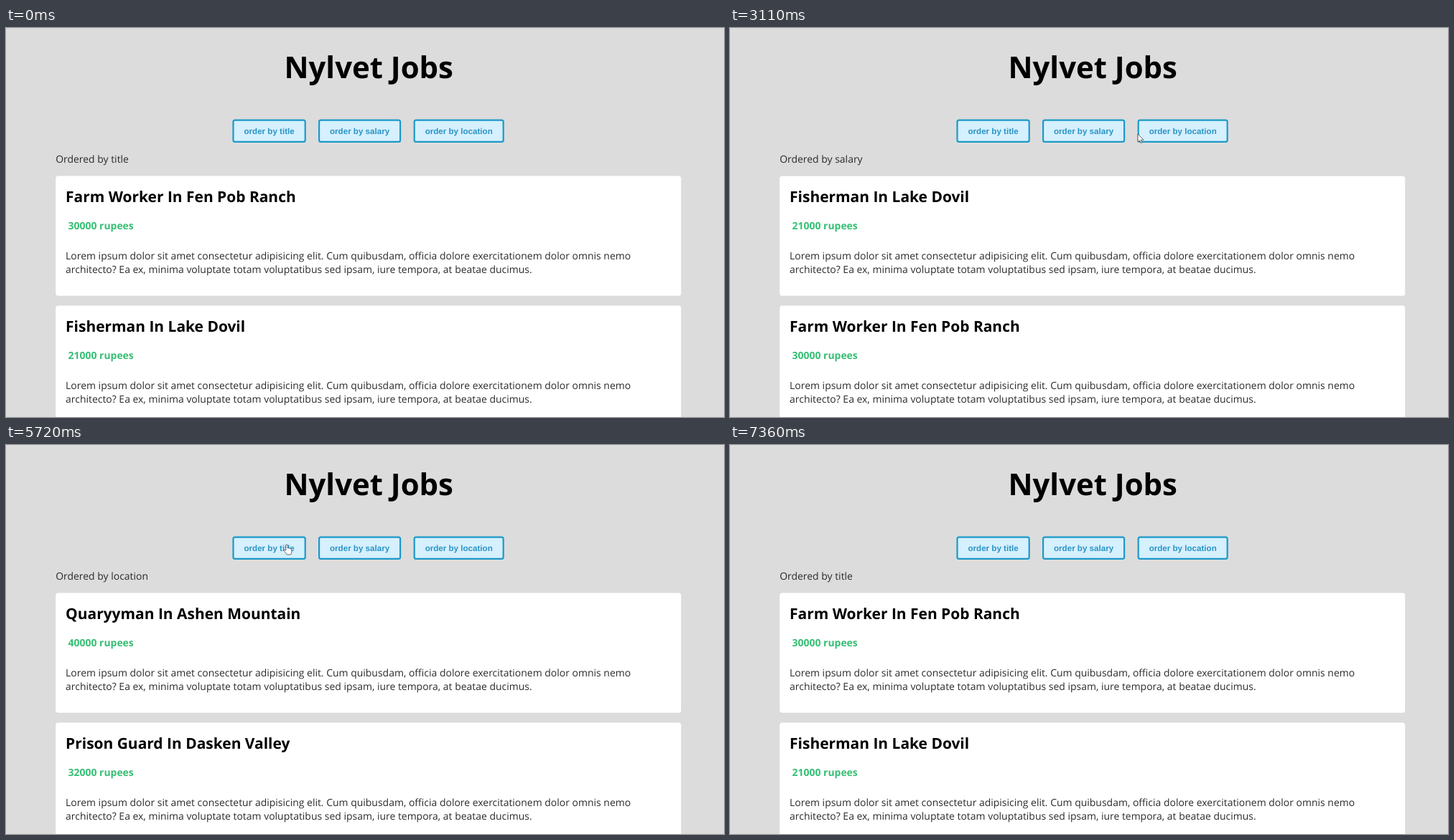
Recreate the animation shown at these times as an HTML page. Size 1000 px wide and 543 px high, loop 8270 ms.

```html
<!DOCTYPE html>
<html lang="en">
<head>
<meta charset="utf-8">
<title>Job list</title>
<style>
  html, body { margin: 0; width: 100%; height: 100%; overflow: hidden; background: #dcdcdc; }
  svg { display: block; width: 1000px; height: 543px; }
  text { font: 13.96px "Open Sans", sans-serif; fill: #2b2b2b; text-rendering: geometricPrecision; }
  .title { font-size: 41.9px; font-weight: 700; fill: #000; text-anchor: middle; }
  .heading { font-size: 20.94px; font-weight: 700; fill: #000; }
  .salary { font-weight: 700; fill: #35bf74; }
  .button rect { fill: #d5f0ff; stroke: #1c99c9; stroke-width: 2.2px; }
  .button text { font: 700 11.6px "Liberation Sans", Arial, sans-serif; fill: #2a94c4; text-anchor: middle; }
  .card rect { fill: #fff; }
  #cursor { fill: #fff; stroke: #444; stroke-width: .8px; stroke-linejoin: round; }
</style>
</head>
<body>
<svg id="stage" viewBox="0 0 1000 543">
  <text class="title" x="505.2" y="70">Nylvet Jobs</text>
  <g id="buttons"></g>
  <text id="label" x="69.2" y="188.4"></text>
  <g id="list"></g>
  <path id="cursor"/>
</svg>
<script>
const LOOP = 8270, STEP = 95, TOP = 206.5, PITCH = 181.1;
const $ = id => document.getElementById(id);

function add(parent, tag, attrs, text = '') {
  const node = document.createElementNS(parent.namespaceURI, tag);
  for (const name in attrs) node.setAttribute(name, attrs[name]);
  node.textContent = text;
  return parent.appendChild(node);
}

// x and width of each outer button box
const buttons = [['title', 315.4, 102.4], ['salary', 435, 115.2], ['location', 567.6, 126.2]];
for (const [key, x, w] of buttons) {
  const g = add($('buttons'), 'g', { class: 'button' });
  add(g, 'rect', { x: x + 1.1, y: 128.7, width: w - 2.2, height: 30.1, rx: 2.4 });
  add(g, 'text', { x: x + w / 2, y: 147.5 }, 'order by ' + key);
}

// ranks: list position in each successive order
const jobs = [
  { name: 'Farm Worker In Fen Pob Ranch', pay: 30000, ranks: [0, 1, 3, 0] },
  { name: 'Fisherman In Lake Dovil', pay: 21000, ranks: [1, 0, 2, 1] },
  { name: 'Prison Guard In Dasken Valley', pay: 32000, ranks: [3, 2, 1, 3] },
  { name: 'Quaryyman In Ashen Mountain', pay: 40000, ranks: [4, 4, 0, 4] }
];
const blurb = [
  'Lorem ipsum dolor sit amet consectetur adipisicing elit. Cum quibusdam, officia dolore exercitationem dolor omnis nemo',
  'architecto? Ea ex, minima voluptate totam voluptatibus sed ipsam, iure tempora, at beatae ducimus.'
];
for (const job of jobs) {
  const g = job.node = add($('list'), 'g', { class: 'card' });
  add(g, 'rect', { x: 69.2, width: 871, height: 167.2, rx: 3.5 });
  add(g, 'text', { class: 'heading', x: 83.1, y: 36.2 }, job.name);
  add(g, 'text', { class: 'salary', x: 86.6, y: 74.4 }, job.pay + ' rupees');
  blurb.forEach((line, i) => add(g, 'text', { x: 83.1, y: 116.1 + i * 19 }, line));
}

// lead: how far the transition has run when the change first shows
const orders = [
  { at: 0, key: 'title', lead: 0 },
  { at: 2150, key: 'salary', lead: 10 },
  { at: 3780, key: 'location', lead: 37 },
  { at: 6110, key: 'title', lead: 61 }
];

// time, x, y of the pointer tip; each place holds until the next
const places = [
  [0, -50, 0], [170, 441, 246], [270, 420, 205], [370, 402, 170], [460, 393, 145], [560, 391, 139],
  [1550, 425, 143], [1640, 458, 146],
  [3000, 520, 147], [3110, 568, 148], [3190, 578, 149], [3290, 582, 149], [3390, 584, 149], [3480, 584.5, 149],
  [5330, 560, 147], [5430, 490, 142], [5530, 425, 138], [5620, 397, 137], [5720, 391, 139],
  [7270, 392, 178], [7360, -50, 0]
];
const ARROW = 'M0 0V11.2L2.6 8.8 4.3 12.6 6 11.9 4.4 8.2H8Z';
const HAND = 'M-1.2 8.2V.9Q-1.2-.1 0-.1T1.2.9V5Q2.3 4.2 3.4 5.2Q4.5 4.6 5.3 5.8Q6.8 5.4 6.8 7V10Q6.8 12 5.6 14H.2Q-.8 12-3.6 9Q-4.4 8-3.4 7.5T-1.2 8.2Z';

// CSS "ease": cubic-bezier(.25, .1, .25, 1)
function ease(x) {
  if (x >= 1) return 1;
  const bezier = (a, b, s) => 3 * a * s * (1 - s) ** 2 + 3 * b * s * s * (1 - s) + s ** 3;
  let lo = 0, hi = 1;
  for (let i = 0; i < 24; i++) {
    const mid = (lo + hi) / 2;
    if (bezier(.25, .25, mid) < x) lo = mid; else hi = mid;
  }
  return bezier(.1, 1, lo);
}

let shown = -1;
function draw(t) {
  const now = orders.findLastIndex(o => o.at <= t);
  const { at, key, lead } = orders[now];
  if (now !== shown) {
    shown = now;
    $('label').textContent = 'Ordered by ' + key;
    [...jobs].sort((a, b) => a.ranks[now] - b.ranks[now]).forEach(job => $('list').append(job.node));
  }
  const p = ease((Math.floor((t - at) / STEP) * STEP + lead) / 1000);
  for (const { node, ranks } of jobs) {
    const from = ranks[Math.max(now - 1, 0)];
    const rank = from + (ranks[now] - from) * p;
    node.setAttribute('transform', `translate(0 ${TOP + rank * PITCH})`);
  }

  const [, x, y] = places.findLast(place => place[0] <= t);
  const over = y > 128 && y < 160 && buttons.some(([, bx, w]) => x > bx + 2 && x < bx + w);
  $('cursor').setAttribute('d', over ? HAND : ARROW);
  $('cursor').setAttribute('transform', `translate(${x} ${y})`);
}

const start = performance.now();
function tick() {
  draw((performance.now() - start) % LOOP);
  requestAnimationFrame(tick);
}
tick();
</script>
</body>
</html>
```
